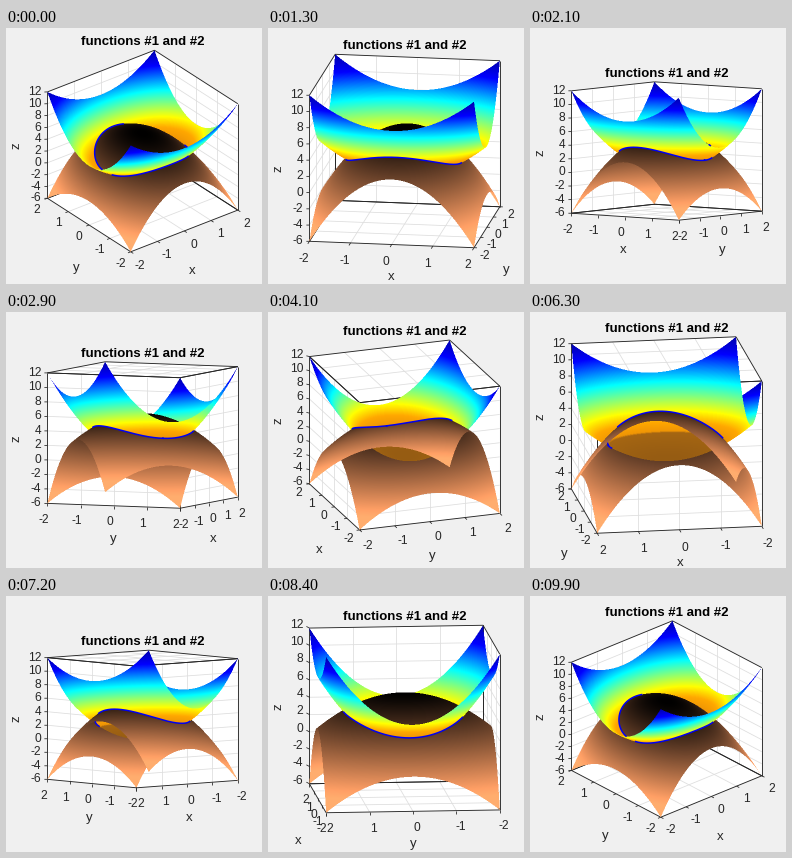
A matplotlib script that plays this animation: 256 px wide and 256 px high, repeating every 10 s.

```python
import numpy as np
import matplotlib.pyplot as plt
from matplotlib.animation import FuncAnimation
from matplotlib.collections import LineCollection, PolyCollection

SIZE, DPI, FRAMES = 256, 64, 100
CX, CY, SPAN = 136.6, 123.0, 190.4
R, ZLO, ZHI = 2, -6, 12
ZRATIO = 0.905
INK = (0.15, 0.15, 0.15)

plt.rcParams["font.family"] = "Liberation Sans"

# each surface is z = a x^2 + b y^2 + h
BOWL, HILL = (1, 2, 0), (-2, -1, 6)


def px(n):
    """Pixels to points."""
    return n * 72 / DPI


def bowl_colors(n=256):
    z = np.linspace(0, 12, n)
    stops = [0, 1.9, 2.05, 2.9, 4, 7, 10, 12]
    red = [150, 165, 240, 255, 255, 0, 0, 0]
    green = [92, 102, 150, 168, 255, 255, 0, 0]
    blue = [18, 18, 5, 0, 0, 255, 255, 170]
    return np.stack([np.interp(z, stops, ch) for ch in (red, green, blue)], 1) / 255


def hill_colors(n=256):
    t = np.clip((6 - np.linspace(-6, 6, n)) / 12, 0, 0.87)
    return np.stack([np.minimum(1, 1.25 * t), 0.7812 * t, 0.4975 * t], 1)


LUT = np.concatenate([bowl_colors(), hill_colors()]).astype(np.float32)


class View:
    """Orthographic camera; the box always fills the same width."""

    def __init__(self, i):
        az = np.radians(-37.9 + 3.6 * i)
        el = 30 - 1.2 * i if i <= 50 else -30 + 1.2 * (i - 51)
        self.el = el
        self.c, self.s = np.cos(az), np.sin(az)
        self.ce, self.se = np.cos(np.radians(el)), np.sin(np.radians(el))
        self.k = SPAN / (2 * R * (abs(self.c) + abs(self.s)))
        self.kz = self.k * 2 * R * ZRATIO / (ZHI - ZLO)
        self.xb = -R if self.s > 0 else R
        self.yb = R if self.c > 0 else -R
        self.zb = ZLO if el > 0 else ZHI

    def depth(self, x, y):
        return -x * self.s + y * self.c

    def project(self, x, y, z):
        u = self.k * (x * self.c + y * self.s)
        v = self.kz * (z - 3) * self.ce + self.k * self.depth(x, y) * self.se
        return CX + u, CY - v

    def direction(self, x, y):
        """Unit screen vector of a horizontal direction."""
        ax, ay = self.project(0, 0, 0)
        bx, by = self.project(x, y, 0)
        d = np.array([bx - ax, by - ay])
        return d / max(np.hypot(*d), 1e-9)

    def hit(self, sx, sy):
        """Nearest surface along each pixel ray: depth, height, is hill."""
        c, s = self.c, self.s
        p = (sx - CX) / self.k
        z0 = 3 + (CY - sy) / (self.kz * self.ce)
        slope = self.k * self.se / (self.kz * self.ce)
        best = np.full(np.shape(p), np.inf, dtype=p.dtype)
        hill = np.zeros(np.shape(p), bool)
        for a, b, h in (BOWL, HILL):
            qa = a * s * s + b * c * c
            qb = 2 * p * c * s * (b - a) + slope
            qc = p * p * (a * c * c + b * s * s) + h - z0
            root = np.sqrt(qb * qb - 4 * qa * qc)
            for sign in (-1, 1):
                d = (sign * root - qb) / (2 * qa)
                ok = (np.abs(p * c - d * s) <= R) & (np.abs(p * s + d * c) <= R)
                ok &= d < best
                best = np.where(ok, d, best)
                hill = np.where(ok, h == 6, hill)
        return best, z0 - slope * best, hill


# two by two samples per pixel inside the plot area
X0, X1, Y0, Y1 = 40, 234, 16, 230
GX, GY = np.meshgrid(np.arange(X0, X1, 0.5) + 0.25, np.arange(Y0, Y1, 0.5) + 0.25)
GX, GY = GX.astype(np.float32), GY.astype(np.float32)


def shade(view):
    d, z, hill = view.hit(GX, GY)
    solid = np.isfinite(d)
    z = np.where(solid, z, 0)
    level = np.clip((z + 6 * hill) / 12 * 255, 0, 255).astype(int) + 256 * hill
    rgba = np.concatenate([LUT[level], np.ones(z.shape + (1,), np.float32)], 2)
    rgba *= solid[..., None]
    h, w = z.shape
    rgba = rgba.reshape(h // 2, 2, w // 2, 2, 4).mean((1, 3))
    rgba[..., :3] /= np.maximum(rgba[..., 3:], 1e-6)
    return np.clip(rgba, 0, 1)


def rim(view):
    """Intersection circle, hidden where a surface lies in front."""
    a = np.linspace(0, 2 * np.pi, 361)
    x, y = np.sqrt(2) * np.cos(a), np.sqrt(2) * np.sin(a)
    sx, sy = view.project(x, y, x * x + 2 * y * y)
    seen = view.depth(x, y) < view.hit(sx, sy)[0] + 0.12
    return np.where(seen, sx, np.nan), np.where(seen, sy, np.nan)


XT = range(-R, R + 1)
ZT = range(ZLO, ZHI + 1, 2)


def grid_lines(v):
    def seg(p, q):
        return [v.project(*p), v.project(*q)]

    lines, edges = [], []
    for t in XT:
        part = edges if abs(t) == R else lines
        part += [seg((t, -R, v.zb), (t, R, v.zb)), seg((-R, t, v.zb), (R, t, v.zb)),
                 seg((t, v.yb, ZLO), (t, v.yb, ZHI)), seg((v.xb, t, ZLO), (v.xb, t, ZHI))]
    for t in ZT:
        part = edges if t in (ZLO, ZHI) else lines
        part += [seg((-R, v.yb, t), (R, v.yb, t)), seg((v.xb, -R, t), (v.xb, R, t))]
    return lines, edges


def walls(v):
    sq = [(-R, -R), (R, -R), (R, R), (-R, R)]
    up = [(-R, ZLO), (R, ZLO), (R, ZHI), (-R, ZHI)]
    return [[v.project(x, y, v.zb) for x, y in sq],
            [v.project(x, v.yb, z) for x, z in up],
            [v.project(v.xb, y, z) for y, z in up]]


fig = plt.figure(figsize=(SIZE / DPI, SIZE / DPI), dpi=DPI, facecolor="#f0f0f0")
ax = fig.add_axes([0, 0, 1, 1])
ax.axis("off")

panes = PolyCollection([], facecolors="white", edgecolors="none", zorder=1)
grid = LineCollection([], colors="#dedede", linewidths=px(0.8), zorder=2)
frame_box = LineCollection([], colors=[INK], linewidths=px(0.9), zorder=3)
marks = LineCollection([], colors=[INK], linewidths=px(0.8), zorder=3)
for item in (panes, grid, frame_box, marks):
    ax.add_collection(item, autolim=False)
surface = ax.imshow(np.zeros((2, 2, 4)), extent=(X0, X1, Y1, Y0),
                    interpolation="nearest", zorder=4)
ring, = ax.plot([], [], color=(0, 0, 0.95), lw=px(1.5), zorder=5)
ax.set_aspect("auto")
ax.set_xlim(0, SIZE)
ax.set_ylim(SIZE, 0)


def label(text, size=12, **kw):
    style = dict(ha="center", va="center", color=INK, zorder=6)
    style.update(kw)
    return ax.text(0, 0, text, fontsize=px(size), **style)


title = label("functions #1 and #2", 13.3, weight="bold", color="black",
              va="center_baseline")
names = [label("x", 13.3), label("y", 13.3)]
zname = label("z", 13.3, rotation=90)
ticks = [[label(str(t)) for t in XT] for _ in range(2)]
zticks = [label(str(t), ha="right") for t in ZT]


def place_axis(v, points, out, name, texts):
    """Place tick labels and the axis name; return tick marks."""
    side = np.sign(out[0])
    if abs(v.el) < 12:
        shift = np.array([4 * side, 16.5])
        out = np.array([0, 1])
    else:
        shift = np.array([11 * out[0], 7.5 + 12 * out[1]])
    for text, p in zip(texts, points):
        text.set_position(np.add(p, shift))
    run = np.subtract(points[-1], points[0])
    steep = abs(run[1]) / np.hypot(*run)
    mid = np.add(points[0], points[-1]) / 2
    name.set_position(mid + (23 * steep * side, 32 + 11 * min(1, 2 * steep)))
    return [[p, np.add(p, 3 * out)] for p in points]


def update(i):
    v = View(i)
    panes.set_verts(walls(v))
    lines, edges = grid_lines(v)
    grid.set_segments(lines)
    frame_box.set_segments(edges)
    surface.set_data(shade(v))
    ring.set_data(*rim(v))

    # rulers run along the lowest edges on screen
    near = -1 if v.el > 0 else 1
    xe, ye = near * v.xb, near * v.yb
    segs = place_axis(v, [v.project(t, ye, ZLO) for t in XT],
                      v.direction(0, ye), names[0], ticks[0])
    segs += place_axis(v, [v.project(xe, t, ZLO) for t in XT],
                       v.direction(xe, 0), names[1], ticks[1])

    left = (-R if v.c > 0 else R, -R if v.s > 0 else R)
    lift = 5 * v.direction(left[0], 0)[1] ** 3
    for text, t in zip(zticks, ZT):
        x, y = v.project(*left, t)
        text.set_position((x - 6, y + lift))
        segs.append([(x, y), (x - 3, y + lift / 2)])
    marks.set_segments(segs)
    zname.set_position((10, v.project(*left, 3)[1] + 0.5))

    top = min(v.project(x, y, ZHI)[1] for x in (-R, R) for y in (-R, R))
    title.set_position((136.4, top - 9.5))
    return []


np.seterr(invalid="ignore")
anim = FuncAnimation(fig, update, frames=FRAMES, interval=100,
                     init_func=lambda: [], repeat=True, repeat_delay=0)
plt.show()
```
